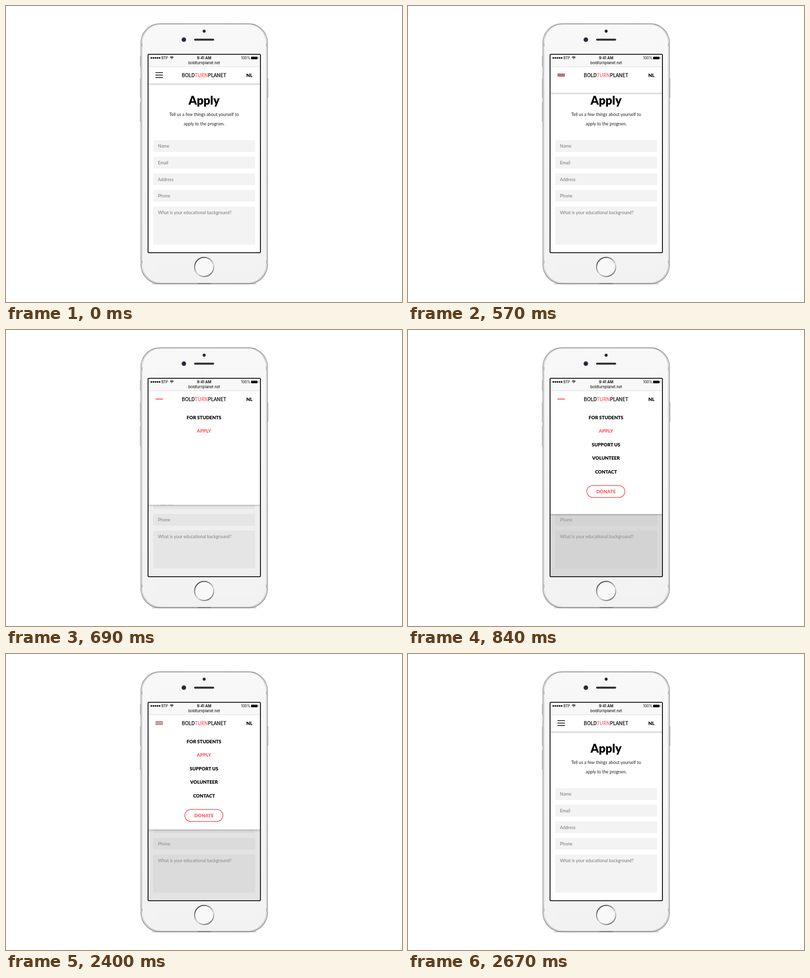
Write an HTML page that moves like this. It is 800 by 600 pixels and loops after 3600 ms.

```html
<!DOCTYPE html>
<html lang="en">
<head>
<meta charset="utf-8">
<title>Mobile menu</title>
<style>
html, body { margin: 0; width: 100%; height: 100%; overflow: hidden; background: #fff; }
svg { display: block; width: 800px; height: 600px; }
text { font-family: Lato, "Open Sans", sans-serif; }
.mid { text-anchor: middle; }
.sys text { font-family: Inter, Roboto, sans-serif; fill: #000; }
.logo {
  font: 500 10px "Noto Sans CJK JP", "Noto Sans CJK SC", "Noto Sans CJK", "Noto Sans", sans-serif;
  stroke: #000; stroke-width: .25;
}
.logo tspan { fill: #ff5c62; stroke: #ff5c62; }
.hint text { font-size: 8.9px; fill: #777; }
.menu text { font-size: 9.4px; font-weight: 900; }
</style>
</head>
<body>
<svg viewBox="0 0 800 600" xmlns="http://www.w3.org/2000/svg">
  <defs>
    <linearGradient id="rim" x2="1" y2="0">
      <stop offset="0" stop-color="#aaa"/><stop offset=".008" stop-color="#e2e2e2"/>
      <stop offset=".02" stop-color="#cdcdcd"/><stop offset=".5" stop-color="#d2d2d2"/>
      <stop offset=".98" stop-color="#cdcdcd"/><stop offset=".992" stop-color="#e2e2e2"/>
      <stop offset="1" stop-color="#aaa"/>
    </linearGradient>
    <linearGradient id="outline" x2="0" y2="1">
      <stop offset="0" stop-color="#8c8c8c"/><stop offset=".12" stop-color="#a0a0a0"/>
      <stop offset=".88" stop-color="#a0a0a0"/><stop offset="1" stop-color="#757575"/>
    </linearGradient>
    <linearGradient id="face" x2="0" y2="1">
      <stop offset="0" stop-color="#f8f8f8"/><stop offset="1" stop-color="#f2f2f2"/>
    </linearGradient>
    <linearGradient id="ring" x1=".1" y1="0" x2=".75" y2="1">
      <stop offset="0" stop-color="#3c3c3c"/><stop offset=".35" stop-color="#909090"/>
      <stop offset=".65" stop-color="#d4d4d4"/><stop offset="1" stop-color="#707070"/>
    </linearGradient>
    <linearGradient id="drop" x2="0" y2="1">
      <stop offset="0" stop-color="#000" stop-opacity=".2"/><stop offset="1" stop-color="#000" stop-opacity="0"/>
    </linearGradient>
    <clipPath id="view"><rect x="287.5" y="98.5" width="225.5" height="401"/></clipPath>
  </defs>

  <!-- phone body -->
  <g fill="#dcdcdc" stroke="#9c9c9c" stroke-width=".6">
    <rect x="270.9" y="101" width="3" height="22" rx="1"/>
    <rect x="270.9" y="147" width="3" height="39" rx="1"/>
    <rect x="270.9" y="195" width="3" height="40" rx="1"/>
    <rect x="526.6" y="147" width="3" height="39" rx="1"/>
  </g>
  <path d="M295 563.2H506" stroke="#999" stroke-width="1"/>
  <rect x="272.4" y="35.9" width="256" height="527.2" rx="38.5" fill="url(#rim)" stroke="url(#outline)" stroke-width="1.1"/>
  <path d="M272.5 75.5h4v6h-4zM524.5 75.5h4v6h-4zM272.5 516h4v6h-4zM524.5 516h4v6h-4z" fill="#bdbdbd"/>
  <rect x="276.4" y="38.2" width="248" height="521.8" rx="35.5" fill="url(#face)" stroke="#fafafa" stroke-width=".9"/>
  <path d="M387 562.8H414" stroke="#555" stroke-width="1"/>
  <circle cx="400.3" cy="51" r="3.1" fill="#2b2b2d"/>
  <circle cx="359.3" cy="68.2" r="4.6" fill="#30343d"/>
  <circle cx="359.3" cy="68.2" r="2.3" fill="#19253c"/>
  <rect x="380" y="66.2" width="40.5" height="4" rx="2" fill="#303032"/>
  <circle cx="400.3" cy="529" r="19.3" fill="#f8f8f8" stroke="url(#ring)" stroke-width="2.2"/>

  <!-- screen -->
  <rect x="287" y="98" width="226.5" height="402" rx="1.5" fill="#fff"/>
  <g clip-path="url(#view)">
    <text class="mid" x="400" y="199.6" font-size="23.6" font-weight="900">Apply</text>
    <g class="mid" font-size="8.8" fill="#222">
      <text x="400.3" y="223">Tell us a few things about yourself to</text>
      <text x="400.3" y="242">apply to the program.</text>
    </g>
    <g class="hint" id="form"></g>
    <rect id="dim" x="287" y="123" width="227" height="377" fill="#a8a8a8"/>
    <rect id="shade" x="287" width="227" height="4.5" fill="url(#drop)"/>
    <rect id="panel" x="287" y="123" width="227" fill="#fff"/>
    <g class="menu mid" id="menu"></g>
    <g id="bars" stroke-width="1.5"><path/><path/><path/></g>
    <text class="logo mid" x="400" y="143.8">BOLD<tspan>TURN</tspan>PLANET</text>
    <text class="mid" x="491.8" y="143.8" font-size="9.6" font-weight="900">NL</text>

    <!-- status bar -->
    <rect x="287" y="98" width="227" height="25" fill="#f8f8f8"/>
    <path d="M287 123.2H514" stroke="#d4d4d4" stroke-width=".8"/>
    <g class="sys">
      <path d="M293.6 105.3H311" stroke="#111" stroke-width="3.5" stroke-linecap="round" stroke-dasharray="0 4.15"/>
      <text x="314" y="108" font-size="7.1">BTP</text>
      <g fill="none" stroke="#111" stroke-width="1.2">
        <path d="M331.2 104.3q3.6-3.4 7.2 0M332.6 105.9q2.2-2 4.4 0"/>
        <path d="M333.6 106.7h2.4l-1.2 1.3z" fill="#111" stroke="none"/>
      </g>
      <text class="mid" x="400.3" y="108" font-size="7.4" font-weight="600">9:41 AM</text>
      <text x="475" y="108" font-size="7.1">100%</text>
      <rect x="495" y="102.7" width="13" height="5.3" rx="1.3" fill="#111"/>
      <path d="M509.2 104.2v2.3" stroke="#111" stroke-width="1"/>
      <text class="mid" x="400.3" y="118" font-size="7.4">boldturnplanet.net</text>
    </g>
  </g>
  <rect x="287" y="97.9" width="227" height="402.2" rx="1.8" fill="none" stroke="#111" stroke-width="1.8"/>
</svg>

<script>
const LOOP = 3600, STEP = 30;
const TOP = 157, BOTTOM = 373;
const RED = [255, 90, 95], BLACK = [17, 17, 17];
const $ = id => document.getElementById(id);
const clamp = v => Math.max(0, Math.min(1, v));
const span = (t, a, b) => clamp((t - a) / (b - a));
const mix = (a, b, p) => a + (b - a) * p;

// Ease with flat ends: a cubic Bezier through (x1,0) and (x2,1)
function ease(p, x1, x2) {
  let lo = 0, hi = 1;
  for (let i = 0; i < 24; i++) {
    const s = (lo + hi) / 2, r = 1 - s;
    if (3 * r * r * s * x1 + 3 * r * s * s * x2 + s * s * s < p) lo = s; else hi = s;
  }
  return lo * lo * (3 - 2 * lo);
}

const hints = ["Name", "Email", "Address", "Phone", "What is your educational background?"];
$("form").innerHTML = hints.map((label, i) => {
  const y = 272 + i * 33.6;
  return `<rect x="297.3" y="${y}" width="206" height="${i < 4 ? 24 : 77}" rx="3" fill="#f3f3f3"/>
    <text x="307" y="${y + 15.3}">${label}</text>`;
}).join("");

// Each entry: label, centre height, start and end of its fade
const items = [
  ["FOR STUDENTS", 177.2, 590, 640],
  ["APPLY", 204.8, 630, 685],
  ["SUPPORT US", 232.4, 690, 725],
  ["VOLUNTEER", 260, 700, 740],
  ["CONTACT", 287.5, 710, 750],
  ["DONATE", 327.3, 755, 840]
];
$("menu").innerHTML = items.map(([label, y], i) => {
  const pill = i === 5
    ? `<rect x="361.2" y="${y - 12.1}" width="77" height="24.2" rx="12.1" fill="none" stroke="#ff5a5f" stroke-width="1.5"/>` : "";
  const color = i === 1 || i === 5 ? "#ff5a5f" : "#000";
  return `<g>${pill}<text x="400" y="${y + 3.4}" fill="${color}">${label}</text></g>`;
}).join("");

const rows = [...$("menu").children];
const bars = [...$("bars").children];

function draw(t) {
  const closing = t >= 2280;
  const open = closing
    ? 1 - ease(span(t, 2270, 2670), .8, .45)
    : ease(span(t, 440, 820), .9, .1);
  const edge = mix(TOP, BOTTOM, open);
  $("panel").setAttribute("height", edge - 123);
  $("shade").setAttribute("y", edge);
  const dim = closing ? 1 - span(t, 2310, 2670) : span(t, 580, 830);
  $("dim").setAttribute("opacity", dim * .43);

  rows.forEach((row, i) => {
    const [, y, from, to] = items[i];
    const p = span(t, from, to);
    row.setAttribute("opacity", closing ? clamp((edge - y - 8) / 12) : p);
    const lift = i === 5 && !closing ? (p - 1) * 10 : 0;
    row.setAttribute("transform", `translate(0 ${lift})`);
  });

  const fold = closing
    ? 1 - Math.sin(span(t, 2262, 2610) * Math.PI / 2)
    : span(t, 225, 690) ** 2;
  const tint = closing ? 1 - span(t, 2270, 2670) : fold;
  const color = BLACK.map((c, i) => Math.round(mix(c, RED[i], tint)));
  $("bars").setAttribute("stroke", `rgb(${color})`);
  bars.forEach((bar, i) =>
    bar.setAttribute("d", `M302 ${140 + (i - 1) * 4.9 * (1 - fold)}H317`));
}

const start = performance.now();
function tick() {
  const t = (performance.now() - start) % LOOP;
  draw(Math.floor(t / STEP) * STEP);
  requestAnimationFrame(tick);
}
draw(0);
requestAnimationFrame(tick);
</script>
</body>
</html>
```
